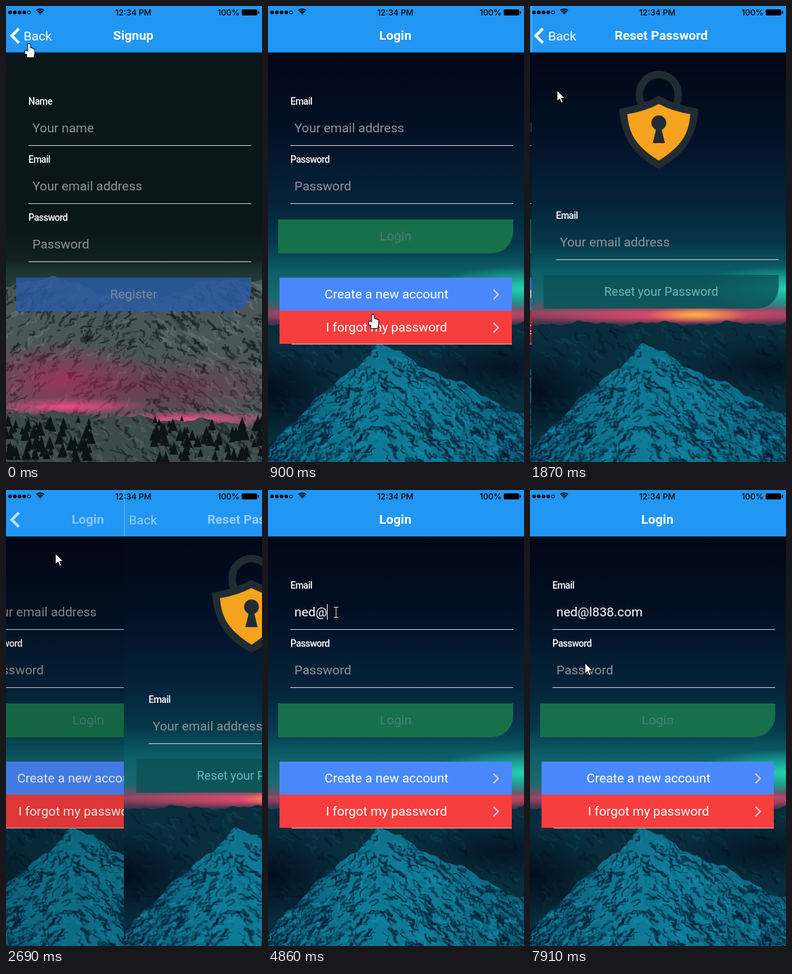
Animation, 378 px wide and 675 px high, one loop 8000 ms. Source, as an HTML page with a canvas:

```html
<!DOCTYPE html>
<html lang="en">
<head>
<meta charset="utf-8">
<title>Login flow</title>
<style>
html, body { margin: 0; height: 100%; overflow: hidden; background: #020818; }
canvas { display: block; }
</style>
</head>
<body>
<canvas id="stage" width="378" height="675"></canvas>
<script>
const W = 378, H = 675, LOOP = 8000, SLIDE = 415;
const stage = document.getElementById('stage').getContext('2d');
let c = stage;

function text(str, x, y, color, { size = 19, weight = 400, align = 'left', spacing = 0, family = 'Roboto' } = {}) {
  c.font = `${weight} ${size}px ${family}, sans-serif`;
  c.letterSpacing = spacing + 'px';
  c.textAlign = align;
  c.fillStyle = color;
  c.fillText(str, x, y);
}
function rect(x, y, w, h, color, radius = 0) {
  c.beginPath();
  c.roundRect(x, y, w, h, radius);
  c.fillStyle = color;
  c.fill();
}
function trace(points) {
  c.beginPath();
  points.forEach(([x, y]) => c.lineTo(x, y));
}
function poly(points, color) {
  trace(points);
  c.fillStyle = color;
  c.fill();
}
function line(points, color, width) {
  trace(points);
  c.strokeStyle = color;
  c.lineWidth = width;
  c.stroke();
}
function arc(x, y, r, color, width, from = 0, to = 7) {
  c.beginPath();
  c.arc(x, y, r, from, to);
  c.strokeStyle = color;
  c.lineWidth = width;
  c.stroke();
}
function disc(x, y, r, color) {
  rect(x - r, y - r, 2 * r, 2 * r, color, r);
}
function chevron(x, y, size, color, width) {
  line([[x - size, y - Math.abs(size)], [x, y], [x - size, y + Math.abs(size)]], color, width);
}

// ---- Backdrops, painted once ----
function random(seed) {
  return () => (seed = (seed * 16807) % 2147483647) / 2147483647;
}
function sky(stops) {
  const g = c.createLinearGradient(0, 0, 0, H);
  stops.forEach(([y, color]) => g.addColorStop(y / H, color));
  rect(0, 0, W, H, g);
}
function glow(x, y, rx, ry, rgb, alpha) {
  c.save();
  c.translate(x, y);
  c.scale(rx, ry);
  const g = c.createRadialGradient(0, 0, 0, 0, 0, 1);
  g.addColorStop(0, `rgba(${rgb},${alpha})`);
  g.addColorStop(1, `rgba(${rgb},0)`);
  rect(-1, -1, 2, 2, g);
  c.restore();
}
const rough = x => 3 * Math.sin(x / 17) + 2 * Math.sin(x / 7 + 1) + Math.sin(x / 2.9);

// Land below the curve top(x), creased by short strokes running down from the summit.
function land(top, summit, fill, shades, count, seed) {
  const rnd = random(seed), ridge = [];
  for (let x = 0; x <= W; x += 2) ridge.push([x, top(x)]);
  c.save();
  trace([...ridge, [W, H], [0, H]]);
  c.clip();
  rect(0, 0, W, H, fill);
  c.globalAlpha = .65;
  for (let i = 0; i < count; i++) {
    let x = rnd() * W, y = top(x) + rnd() * (H - top(x));
    const side = x < summit ? -1 : 1, crease = [[x, y]];
    for (let k = 0; k < 4; k++) crease.push([x += side * (rnd() * 8 - 2), y += rnd() * 6 - 1]);
    line(crease, shades[i % shades.length], 1 + rnd() * 3);
  }
  c.restore();
}
function backdrop(paint) {
  const canvas = document.createElement('canvas');
  canvas.width = W;
  canvas.height = H;
  c = canvas.getContext('2d');
  c.lineJoin = c.lineCap = 'round';
  paint();
  c = stage;
  return canvas;
}

const dusk = backdrop(() => {
  sky([[70, '#020716'], [190, '#031126'], [290, '#05233a'], [350, '#06374a'], [395, '#0c5f68'],
    [435, '#1b6a70'], [455, '#8a4462'], [475, '#2b3046']]);
  glow(378, 418, 140, 34, '40,235,195', .8);
  glow(220, 458, 260, 14, '255,75,110', .9);
  glow(245, 457, 75, 12, '255,185,70', .95);
  land(x => 470 + rough(x) * .8, 0, '#082d3d', ['#051d2c', '#0c4050'], 300, 11);
  glow(0, 570, 110, 70, '2,10,26', .9);
  glow(350, 535, 130, 45, '2,10,26', .7);
  const slope = c.createRadialGradient(190, 610, 60, 190, 610, 240);
  slope.addColorStop(0, '#0e7a95');
  slope.addColorStop(1, '#0a4f68');
  land(x => 500 + (x < 165 ? .9 : .5) * Math.abs(x - 165) + rough(x), 165, slope,
    ['#05233a', '#1189a6', '#07304a', '#0d6882', '#041a30'], 1100, 5);
});

const rose = backdrop(() => {
  sky([[0, '#0a1517'], [330, '#0a1719'], [375, '#10211f'], [392, '#1c3432'], [430, '#2a4442']]);
  land(x => 418 + 14 * Math.cos(x / 45 - 4.4) + rough(x), 195, '#4a5658',
    ['#1a2427', '#647070', '#2a3538', '#12191c'], 1000, 23);
  glow(80, 555, 150, 60, '195,35,95', .65);
  glow(240, 565, 180, 50, '140,35,80', .5);
  glow(90, 593, 130, 13, '255,75,140', .9);
  glow(270, 612, 160, 13, '255,80,145', .9);
  land(x => 600 + x * .05 + rough(x), 0, '#3c4a4d', ['#1a2427', '#4e5c5e'], 260, 31);
  const rnd = random(41);
  for (let i = 0; i < 150; i++) {
    const x = 165 + (i % 2 ? 50 + rnd() * 165 : -40 - rnd() * 130);
    const y = 605 + rnd() * 55, h = 8 + rnd() * 14;
    poly([[x, y], [x + h * .35, y + h], [x - h * .35, y + h]], '#0c1418');
  }
});

// ---- Screens ----
function field(x, y, label, hint, value) {
  text(label, x, y - 60, '#fff', { size: 14, weight: 500, spacing: -.5 });
  text(value || hint, x + 6, y - 19, value ? '#fff' : '#8f9496');
  rect(x, y, 329, 1, '#cfd2d4');
}
function button(x, y, label, fill, color, size) {
  rect(x, y, 347, 50, fill, [0, 0, 32, 0]);
  text(label, x + 173.5, y + 31, color, { size, align: 'center' });
}
function row(y, label, fill) {
  rect(17, y, 343, 49, fill);
  rect(35, y + 49, 325, 1, '#c9c9d2');
  text(label, 175, y + 31, '#fff', { align: 'center' });
  chevron(340, y + 25, 7, '#d3d3da', 2);
}

const ADDRESS = 'ned@l838.com';
const KEYS = [3950, 4100, 4320, 4860, 5320, 5460, 5770, 5770, 6230, 6470, 6760, 7070];

function login(t) {
  c.drawImage(dusk, 0, 0);
  const typed = ADDRESS.slice(0, KEYS.filter(k => t >= k).length);
  field(33, 206, 'Email', 'Your email address', typed);
  field(33, 292, 'Password', 'Password');
  if (t >= 3410 && t < 7850) {
    c.font = '400 19px Roboto, sans-serif';
    c.letterSpacing = '0px';
    rect(Math.round(39 + c.measureText(typed).width), 169, 1, 23, '#fff');
  }
  button(15, 316, 'Login', '#16714a', '#507d79');
  row(402, 'Create a new account', '#4a88fd');
  row(451, 'I forgot my password', t >= 1430 && t < 2450 ? '#da3636' : '#f73e3e');
}
function signup() {
  c.drawImage(rose, 0, 0);
  ['Name', 'Email', 'Password'].forEach((label, i) =>
    field(33, 206 + 86 * i, label, ['Your name', 'Your email address', label][i]));
  button(15, 402, 'Register', 'rgba(42,92,165,.82)', '#7f8a94');
}
function shield(w, top, shoulder, bottom, color) {
  const fall = (bottom - shoulder) * .53, knee = top + (shoulder - top) * .75;
  c.beginPath();
  for (const side of [-w, w]) {
    c.moveTo(188, top);
    c.quadraticCurveTo(188 + side * .45, knee, 188 + side, shoulder);
    c.bezierCurveTo(188 + side * .95, shoulder + fall, 188 + side * .55, bottom - 17, 188, bottom);
  }
  c.fillStyle = color;
  c.fill();
}
function reset() {
  const dark = '#212c32';
  c.drawImage(dusk, 0, 0);
  c.beginPath();
  c.roundRect(159.5, 101.5, 57, 60, 28.5);
  c.strokeStyle = dark;
  c.lineWidth = 11;
  c.stroke();
  shield(58.5, 133, 152, 241, dark);
  shield(46.5, 145, 160, 229, '#f6a31f');
  disc(188, 173, 11, dark);
  poly([[185, 178], [191, 178], [197, 203], [179, 203]], dark);
  field(36, 375, 'Email', 'Your email address');
  button(18, 398, 'Reset your Password', 'rgba(8,82,86,.8)', '#73b5b1', 18);
}

// ---- Header ----
function statusBar() {
  for (let i = 0; i < 4; i++) disc(6 + i * 7, 9.5, 2.7, '#000');
  arc(34, 9.5, 2.3, '#000', 1);
  for (let r = 1; r < 9; r += 2.5) arc(50.5, 13, r, '#000', 1.6, -2.3, -.84);
  const font = { size: 12, weight: 500, family: 'Inter' };
  text('12:34 PM', 188, 13.5, '#000', { ...font, align: 'center' });
  text('100%', 345, 13.5, '#000', { ...font, align: 'right' });
  rect(348, 5, 23, 9, '#000', 2);
  rect(372, 7.5, 1.5, 4, '#000');
}
function header(title, center, away, offset, edge, forward) {
  const bold = { weight: 700, align: 'center' };
  rect(0, 0, W, 68, '#2196f3');
  rect(0, 68, W, 1, '#1b6fb2');
  c.globalAlpha = away;
  text('Login', 188 + offset, 50, '#fff', bold);
  c.globalAlpha = 1 - away;
  text(title, center + edge, 50, '#fff', bold);
  text('Back', 26 + (forward ? 117 * away : .89 * edge), 51, '#fff');
  c.globalAlpha = Math.pow(1 - away, .6);
  chevron(8.5, 44, -10.5, '#fff', 4);
  c.globalAlpha = 1;
  if (away > 0 && away < 1) rect(Math.round(edge), 0, 1, 68, 'rgba(255,255,255,.35)');
  statusBar();
}

// ---- Pointer: each move leaves, arrives, and ends at x, y ----
const MOVES = [
  [240, 520, 111, 194], [520, 900, 155, 456], [1040, 1200, 154, 472], [1570, 1870, 40, 125],
  [1870, 2160, 28, 60], [2270, 2300, 37, 40], [2550, 2690, 73, 94], [2690, 3120, 102, 195],
  [3410, 3490, 100, 181], [7580, 7910, 81, 256]];
const ARROW = [[0, 0], [0, 16], [3.7, 12.6], [6.3, 18.5], [8.8, 17.4], [6.3, 11.7], [11.3, 11.5], [0, 0]];

function hand() {
  for (const [grow, color] of [[1, '#000'], [0, '#fff']]) {
    const part = (x, y, w, h) => rect(x - grow, y - grow, w + 2 * grow, h + 2 * grow, color, 1.5 + grow);
    part(-1.5, 1, 3, 14);
    part(-6, 11, 4, 5);
    part(-3, 13, 10, 8);
    for (let i = 0; i < 3; i++) part(1.5 + i * 2, 7 + i * .7, 2.5, 9);
  }
}
function beam() {
  for (const [color, width] of [['#000', 3], ['#e8e8e8', 1]]) {
    for (const y of [-7.5, 7.5]) line([[-3, y], [4, y]], color, width);
    line([[.5, -7.5], [.5, 7.5]], color, width);
  }
}
function pointer(t) {
  let x = 34, y = 55;
  for (const [leave, arrive, tx, ty] of MOVES) {
    const k = Math.min(1, Math.max(0, (t - leave) / (arrive - leave)));
    x += (tx - x) * k;
    y += (ty - y) * k;
  }
  const within = (from, to) => t >= from && t < to;
  c.save();
  c.translate(Math.round(x), Math.round(y));
  if (within(3000, 7780)) beam();
  else if (within(0, 330) || within(700, 1500) || within(2100, 2600)) hand();
  else {
    poly(ARROW, '#fff');
    line(ARROW, '#000', 1);
  }
  c.restore();
}

// cubic-bezier(.36, .66, .04, 1)
function ease(x) {
  if (x <= 0) return 0;
  if (x >= 1) return 1;
  const curve = (s, a, b) => 3 * (1 - s) ** 2 * s * a + 3 * (1 - s) * s * s * b + s ** 3;
  let lo = 0, hi = 1;
  for (let i = 0; i < 24; i++) {
    const mid = (lo + hi) / 2;
    if (curve(mid, .36, .04) < x) lo = mid; else hi = mid;
  }
  return curve(lo, .66, 1);
}

function draw(t) {
  const forward = t >= 1000 && t < 2450;
  const [start, page, title, center] = t < 1000 ? [330, signup, 'Signup', 188]
    : [forward ? 1538 : 2616, reset, 'Reset Password', 191.5];
  const p = ease((t - start) / SLIDE);
  const away = forward ? 1 - p : p, edge = away * W, offset = -.33 * W * (1 - away);

  if (away > 0) {
    c.save();
    c.translate(offset, 0);
    login(t);
    c.restore();
    rect(0, 0, W, H, `rgba(0,0,0,${.2 * (1 - away)})`);
  }
  if (away < 1) {
    c.save();
    c.translate(edge, 0);
    page();
    c.restore();
  }
  header(title, center, away, offset, edge, forward);
  pointer(t);
}

const begin = performance.now();
function tick() {
  draw((performance.now() - begin) % LOOP);
  requestAnimationFrame(tick);
}
tick();
</script>
</body>
</html>
```
